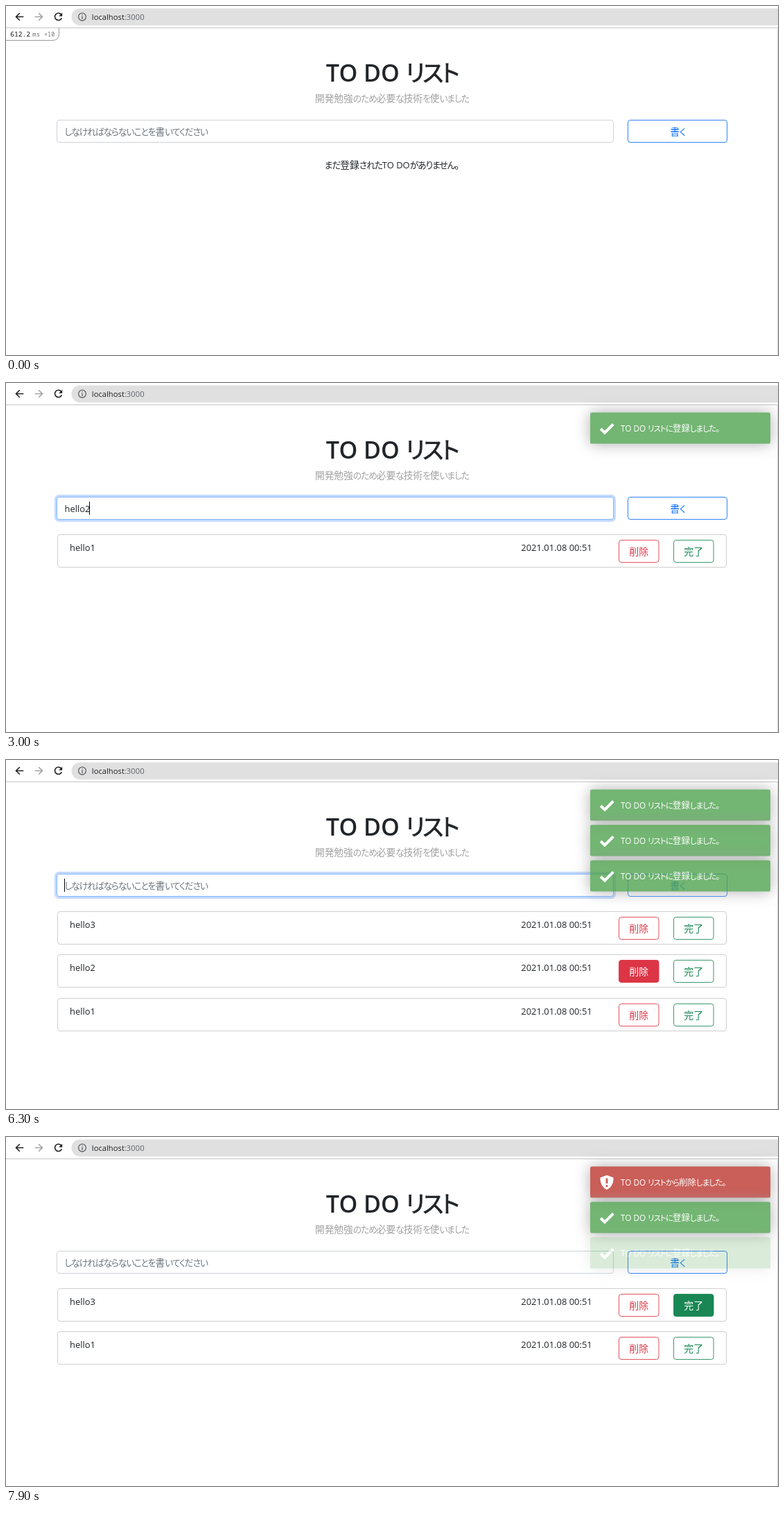
An HTML page for the animation above (8 s loop, 1114x503 px).

```html
<!DOCTYPE html>
<html lang="ja">
<head>
<meta charset="utf-8">
<title>TO DO リスト</title>
<style>
  html, body { margin: 0; width: 100%; height: 100%; overflow: hidden; background: #fff; }
  svg { display: block; width: 1114px; height: 503px; }
  text { font-family: "Noto Sans CJK JP", "Noto Sans CJK", sans-serif; font-feature-settings: "palt"; }
  .latin { font-family: "Open Sans", "Noto Sans", sans-serif; font-size: .945em; }
  .kana { font-size: .935em; letter-spacing: -.085em; }
  .title { font-weight: 500; }
  .title .latin { font-weight: 600; }
  .title .kana { stroke: #212529; stroke-width: .7px; }
  .mono { font-family: "Noto Sans Mono", "DejaVu Sans Mono", monospace; }
  .card { filter: drop-shadow(0 0 10.4px #999); }
</style>
</head>
<body>
<svg viewBox="0 0 1114 503">
  <rect x="94.5" y="3.5" width="1060" height="24.5" rx="12.2" fill="#e0e0e0"/>
  <path d="M0 31.5H1114" stroke="#c6c6c6"/>
  <path d="M1113.5 32V503" stroke="#d9d9d9"/>
  <g fill="none" stroke-width="1.6">
    <path d="M25.3 15.5H14.8M19.8 10.2L14.5 15.5L19.8 20.8" stroke="#202124"/>
    <path d="M41.7 15.5H52.2M47.2 10.2L52.5 15.5L47.2 20.8" stroke="#a0a2a5"/>
    <path d="M79.6 12.2A5.1 5.1 0 1 0 80.4 17.2" stroke="#202124"/>
    <path d="M81.2 9.8V14.8H76.2Z" fill="#202124" stroke="none"/>
    <circle cx="110" cy="15.6" r="5.4" stroke="#5f6368" stroke-width="1.3"/>
    <path d="M110 14.8V18.8M110 12.2V13.5" stroke="#5f6368" stroke-width="1.4"/>
  </g>
  <text x="123.8" y="20" font-size="11.9" fill="#202124"><tspan class="latin">localhost<tspan fill="#5f6368">:3000</tspan></tspan></text>
  <g id="page"></g>
</svg>
<script>
const LOOP = 8000, STEP = 100;
const INK = '#212529', BLUE = '#0d6efd', RED = '#dc3545', GREEN = '#198754';

const typing = [
  [0, ''], [900, 'h'], [1000, 'he'], [1100, 'hel'], [1300, 'hell'], [1400, 'hello'], [1600, 'hello1'],
  [1900, ''], [2400, 'he'], [2500, 'hel'], [2700, 'hell'], [2800, 'hello'], [3000, 'hello2'],
  [3400, ''], [3800, 'h'], [3900, 'he'], [4000, 'he;'], [4100, 'he;l'], [4400, 'he;'], [4500, 'he'],
  [4700, 'hel'], [4800, 'hell'], [4900, 'hello'], [5000, 'hello3'], [5200, '']
];
const lists = [[0, []], [2100, [1]], [3400, [2, 1]], [5300, [3, 2, 1]], [7200, [3, 1]]];
// start, hide, removed item?
const toasts = [[7060, 1e5, true], [5190, 1e5], [3310, 7240], [1945, 6310]];
const hovers = { del2: [6150, 1e5], del1: [7100, 7500], done1: [7500, 7650], done3: [7650, 1e5] };
const focus = { input: [650, 6550], del2: [6550, 1e5] };

const clamp = v => Math.max(0, Math.min(1, v));
const swing = p => .5 - Math.cos(Math.PI * clamp(p)) / 2;
const at = (table, t) => table.filter(e => e[0] <= t).pop()[1];
const level = (span, t) => span ? clamp((t - span[0]) / 150) - clamp((t - span[1]) / 150) : 0;

const runs = s => s.replace(/[ -~]+|[ぁ-ヿ]+/g, m =>
  `<tspan class="${m < '\x7f' ? 'latin' : 'kana'}">${m}</tspan>`);
const text = (x, y, s, fill = INK, size = 13.7, more = '') =>
  `<text x="${x}" y="${y}" fill="${fill}" font-size="${size}" ${more}>${runs(s)}</text>`;
const middle = (x, y, s, fill, size, more = '') => text(x, y, s, fill, size, `text-anchor="middle" ${more}`);
const box = (x, y, w, h, stroke, more = 'fill="none"') =>
  `<rect x="${x}" y="${y}" width="${w}" height="${h}" rx="3.5" stroke="${stroke}" ${more}/>`;
const ring = (x, y, w, h, color, alpha) => alpha > 0 ?
  `<rect x="${x - 1.8}" y="${y - 1.8}" width="${w + 3.6}" height="${h + 3.6}" rx="5" fill="none"
    stroke="${color}" stroke-width="3.5" stroke-opacity="${alpha}"/>` : '';

function button(x, y, w, label, color, hover = 0, glow = 0) {
  const cx = x + w / 2, base = y + 21.5;
  return ring(x, y, w, 32, color, glow * .5) +
    box(x, y, w, 32, color, `fill="${color}" fill-opacity="${hover}" stroke-opacity=".85"`) +
    middle(cx, base, label, color, 13.9, `opacity="${1 - hover}"`) +
    (hover ? middle(cx, base, label, '#fff', 13.9, `opacity="${hover}"`) : '');
}

function row(id, i, t) {
  const y = 218.5 + Math.floor(62.5 * i);
  return box(74.5, y, 965, 47, '#cfcfcf') +
    text(92, y + 23.5, 'hello' + id) + text(743.3, y + 23.5, '2021.01.08 00:51') +
    button(884.5, y + 8, 57.5, '削除', RED, level(hovers['del' + id], t), level(focus['del' + id], t)) +
    button(963.5, y + 8, 57.5, '完了', GREEN, level(hovers['done' + id], t));
}

function toast([start, hide, removed], i, t) {
  const alpha = .8 * swing((t - start) / 280) * (1 - swing((t - hide) / 1000));
  const icon = removed
    ? `<path d="M867 55L876.5 58.5C877 67 873 73 867 76C861 73 857 67 857.5 58.5Z" fill="#fff"/>
       <path d="M867 59.5V67M867 69.2V72" stroke="#bd362f" stroke-width="2.8"/>`
    : '<path d="M858.2 66L864 71.7L876.3 59.3" fill="none" stroke="#fff" stroke-width="4"/>';
  return `<g opacity="${alpha}" transform="translate(0 ${51 * i})">
    <rect class="card" x="843" y="42.5" width="260" height="45" rx="2.6" fill="${removed ? '#bd362f' : '#51a351'}"/>
    ${icon}${text(887, 70, `TO DO リスト${removed ? 'から削除' : 'に登録'}しました。`, '#fff', 12.4)}</g>`;
}

function badge(ms, count) {
  return `<path d="M0 49.5H67Q76.5 49.5 76.5 40V32" fill="none" stroke="#999"/>
    <text class="mono" x="6.3" y="44" font-size="9.6" font-weight="500" fill="#111">${ms}</text>
    <text class="mono" x="38" y="44" font-size="9.4" fill="#777">ms</text>
    <text class="mono" x="55" y="44" font-size="8.5" fill="#777">×${count}</text>`;
}

function field(value, t) {
  const f = level(focus.input, t);
  return ring(73.5, 164.5, 803, 32, BLUE, f * .25) +
    box(73.5, 164.5, 803, 32, f > .5 ? '#86b7fe' : '#ced4da', 'fill="#fff"') +
    text(84.5, 186, value || 'しなければならないことを書いてください', value ? INK : '#6c757d', 13.7, 'id="value"');
}

const page = document.getElementById('page');

function draw(t) {
  const value = at(typing, t), list = at(lists, t);
  const shown = toasts.filter(([start, hide]) => t >= start && t < hide + 1000);
  const caret = t >= 700 && t < 6550 && !(t >= 5800 && t < 6300);
  page.innerHTML =
    (t < 1900 ? badge('612.2', 10) : t < 2100 ? badge('768.0', 12) : '') +
    middle(556.8, 109, 'TO DO リスト', INK, 36, 'class="title"') +
    middle(557, 138, '開発勉強のため必要な技術を使いました', '#a0a0a0') +
    field(value, t) +
    (caret ? '<path id="caret" stroke="#000"/>' : '') +
    button(897.5, 164.5, 143, '書く', BLUE) +
    (list.length ? list.map((id, i) => row(id, i, t)).join('')
      : middle(557, 234, 'まだ登録されたTO DOがありません。')) +
    shown.map((item, i) => toast(item, i, t)).join('');
  if (caret) {
    const width = value ? document.getElementById('value').getComputedTextLength() : 0;
    document.getElementById('caret').setAttribute('d', `M${Math.round(84.5 + width) - .5} 171V190`);
  }
}

const begin = performance.now();
let last = -1;
function tick() {
  const t = Math.floor((performance.now() - begin) % LOOP / STEP) * STEP;
  if (t !== last) draw(last = t);
  requestAnimationFrame(tick);
}
tick();
</script>
</body>
</html>
```
